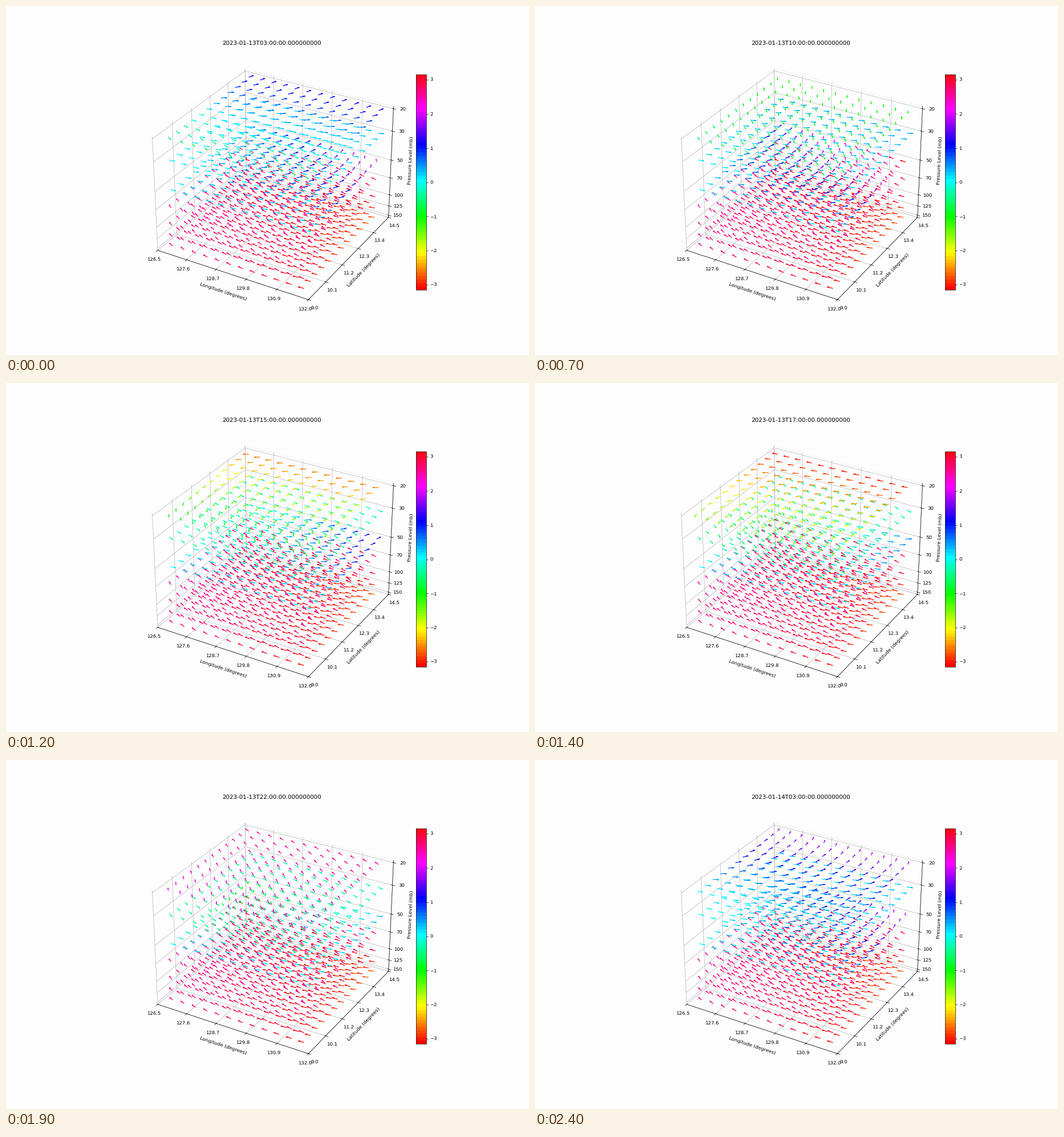
A matplotlib script for the animation above (2.5 s loop, 917x611 px).

```python
import numpy as np
import matplotlib.pyplot as plt
from matplotlib.animation import FuncAnimation
from matplotlib.cm import ScalarMappable
from matplotlib.colors import Normalize
from mpl_toolkits.mplot3d.art3d import Line3DCollection

W, H, DPI = 917, 611, 917 / 15
FRAMES = 25
BG = "#fdfdfd"
N = 12                      # grid points per horizontal side
LENGTH, HEAD = 0.034, 0.3   # arrow length, head share
BARB = 0.0022               # half height of an arrow head

LEVELS = [150, 125, 100, 70, 50, 30, 20]
HEIGHT = np.array([0, 0.09, 0.198, 0.361, 0.528, 0.796, 1])
Z = 0.02 + 0.96 * HEIGHT

# East and north coordinates of the grid, from -1 to 1, and in axis units
X, Y = (g.ravel() for g in np.meshgrid(*[np.linspace(-1, 1, N)] * 2))
GX, GY = 0.5 + 0.4364 * X, 0.5 + 0.4364 * Y


def wind_angle(level, height, hour):
    def daily(peak):
        return np.cos(2 * np.pi * (hour - peak) / 24)

    if level == 20:      # turns clockwise almost once a day
        return 0.7 - 0.235 * hour + (0.9 * Y - 0.4) * daily(0)
    if level == 30:      # swings gently about east
        return 0.1 * Y - 0.07 + 0.48 * daily(4)
    if level == 50:      # swings widely in the north
        return 0.5 + 0.4 * Y + (1 + Y) * (0.4 * X + 0.8 * daily(5))
    # steady easterlies, veering with height
    return 3.1 - 1.2 * height + (0.25 - 0.7 * height) * X + 0.15 * Y


def arrows(z, a):
    """One polyline per arrow: tail, tip, barb, tip, barb."""
    def point(r, dz):
        return np.stack([GX + r * np.cos(a), GY + r * np.sin(a),
                         np.full(a.shape, z + dz)], axis=1)

    tip = point(LENGTH, 0)
    back = LENGTH * (1 - HEAD * np.cos(np.radians(15)))
    return np.stack([point(0, 0), tip, point(back, BARB), tip,
                     point(back, -BARB)], axis=1)


plt.rcParams["text.hinting"] = "no_hinting"
fig = plt.figure(figsize=((W + 0.01) / DPI, (H + 0.01) / DPI), dpi=DPI,
                 facecolor=BG)
ax = fig.add_subplot(projection="3d", facecolor=BG)
hsv = plt.get_cmap("hsv")
fig.colorbar(ScalarMappable(Normalize(-np.pi, np.pi), plt.get_cmap("hsv", 64)),
             ax=ax, shrink=0.8, pad=0.025, aspect=20.1)

ticks = np.linspace(0, 1, 6)
ax.set(xlim=(0, 1), ylim=(0, 1), zlim=(0, 1))
ax.set_xticks(ticks, [f"{v:.1f}" for v in np.linspace(126.5, 132, 6)])
ax.set_yticks(ticks, [f"{v:.1f}" for v in np.linspace(9, 14.5, 6)])
ax.set_zticks(Z, [str(p) for p in LEVELS])
ax.set_xlabel("Longitude (degrees)")
ax.set_ylabel("Latitude (degrees)")
ax.set_zlabel("Pressure Level (mb)")
for axis in (ax.xaxis, ax.yaxis, ax.zaxis):
    axis.pane.set_fill(False)

title = ax.set_title("")
wind = Line3DCollection(np.zeros((1, 5, 3)), linewidths=1.5)
ax.add_collection3d(wind)


def draw(hour):
    theta = [wind_angle(p, h, hour) for p, h in zip(LEVELS, HEIGHT)]
    wind.set_segments(np.concatenate([arrows(z, a) for z, a in zip(Z, theta)]))
    wind.set_color(hsv((np.concatenate(theta) / (2 * np.pi) + 0.5) % 1))
    day, clock = divmod(hour + 3, 24)
    title.set_text(f"2023-01-{13 + day}T{clock:02d}:00:00.000000000")
    return wind, title


anim = FuncAnimation(fig, draw, frames=FRAMES, interval=100, repeat=True,
                     repeat_delay=0)
plt.show()
```
